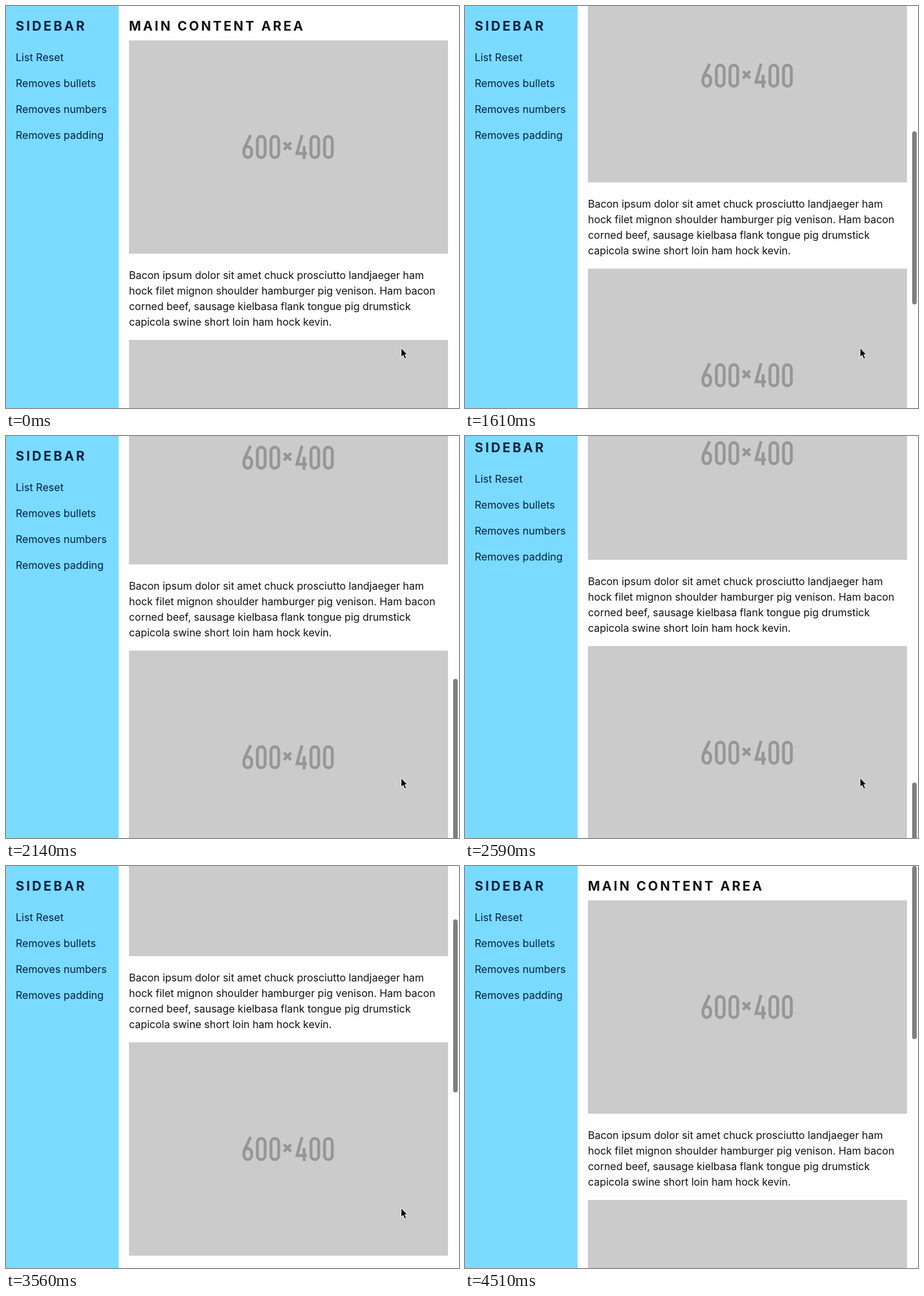
These frames come from a looping animation (700 px wide and 620 px high, 4810 ms). An HTML page:

```html
<!DOCTYPE html>
<html lang="en">
<head>
<meta charset="utf-8">
<title>Fixed sidebar scroll</title>
<style>
  html, body { margin: 0; width: 100%; height: 100%; overflow: hidden; background: #fff; }
  #stage { position: relative; width: 700px; height: 620px; overflow: hidden; background: #fefefe;
    font: 16px/24px Inter, sans-serif; color: #111; white-space: pre; }
  #stage > *, section, h2, p { position: absolute; margin: 0; }
  h2 { top: 19px; font: 700 20px/24px Inter, sans-serif; letter-spacing: 3.15px; }
  #side { left: 0; top: -2px; width: 174px; height: 720px; background: #7adaff; color: #001f3f; }
  #side h2 { left: 15px; top: 21px; letter-spacing: 3.3px; }
  #side p { left: 15px; top: 61px; line-height: 40px; letter-spacing: .04px; }
  #main { left: 190px; top: 0; }
  section svg { display: block; }
  section p { top: 350px; letter-spacing: -.025px; }
  #thumb { left: 690.5px; top: 0; width: 7px; border-radius: 3.5px; background: #7f7f7f; }
  #cursor { left: 0; top: 0; overflow: visible; }
</style>
</head>
<body>
<div id="stage">
  <div id="main"><h2>MAIN CONTENT AREA</h2></div>
  <div id="side"><h2>SIDEBAR</h2><p>List Reset
Removes bullets
Removes numbers
Removes padding</p></div>
  <div id="thumb"></div>
  <svg id="cursor" width="12" height="18">
    <path d="M.5 .5V14.5L3.7 11.6L6 17L8.6 15.9L6.3 10.7H10.3Z" fill="#000" stroke="#eee"/>
  </svg>
</div>
<svg width="0" height="0" style="position:absolute">
  <symbol id="card" viewBox="0 0 493 329">
    <path fill="#cbcbcb" d="M0 0H493V329H0Z"/>
    <g fill="none" stroke="#969696" stroke-width="4.5">
      <path d="M188 146L179.2 164.5Q177.6 168 177.6 171.5V174A6 6.8 0 0 0 189.6 174V170.5A6 6.6 0 0 0 178.2 167.5"/>
      <path d="M239.5 157.5L250.5 168.5M250.5 157.5L239.5 168.5"/>
      <path d="M267.5 146L259.6 174.4H275M270.6 163V183"/>
      <g id="zeros"></g>
    </g>
  </symbol>
</svg>
<script>
const $ = id => document.getElementById(id);
const LOOP = 4810, MAX = 1564, SECTIONS = 5;
const text = `Bacon ipsum dolor sit amet chuck prosciutto landjaeger ham
hock filet mignon shoulder hamburger pig venison. Ham bacon
corned beef, sausage kielbasa flank tongue pig drumstick
capicola swine short loin ham hock kevin.`;

$('zeros').innerHTML = [198.4, 219.4, 281.2, 302.2]
  .map(x => `<rect x="${x}" y="148.3" width="12" height="32.4" rx="6"/>`).join('');
for (let i = 0; i < SECTIONS; i++) {
  $('main').insertAdjacentHTML('beforeend',
    `<section style="top:${53 + 462 * i}px"><svg width="493" height="329"><use href="#card"/></svg><p>${text}</p></section>`);
}

const ticks = [0, 1250, 1340, 1430, 1520, 1610, 1700, 1790, 1880, 1970, 2060, 2140, 2230, 2320,
  2410, 2500, 2590, 2670, 2760, 2850, 2940, 3210, 3300, 3390, 3480, 3560, 3650, 3730, 3820,
  3910, 4000, 4080, 4170, 4260, 4340, 4400, 4450, 4510];

// Swipes as [time, scroll, velocity] knots
const down = [[1190, 0, 0], [1610, 572, 1.7], [2140, 1108, 1.2], [2510, MAX, 1.43]];
const up = [[3170, MAX, 0], [3300, 1537, -0.5], [3620, 0, -2.67]];

function hermite(knots, t) {
  const i = knots.findIndex(k => k[0] >= t);
  const [t0, a, v0] = knots[i - 1], [t1, b, v1] = knots[i];
  const d = t1 - t0, u = (t - t0) / d, w = 1 - u;
  return a * w * w * (1 + 2 * u) + b * u * u * (3 - 2 * u) + d * u * w * (v0 * w - v1 * u);
}

// Rubber band past the end of the page
const bounce = (ms, v) => 0.31 * v * ms * Math.exp(-0.0125 * ms);

function scrollAt(t) {
  if (t <= 1190) return 0;
  if (t <= 2510) return hermite(down, t);
  if (t <= 3170) return MAX + bounce(t - 2510, 1.43);
  if (t <= 3620) return hermite(up, t);
  return -bounce(t - 3620, 2.67);
}

function cursorAt(t) {
  if (t >= 4510) return [671, 640];
  const u = Math.min(1, Math.max(0, (t - 3780) / 560)), e = u * u * (3 - 2 * u);
  return [610 + 60 * e, 527 + 84 * e + Math.max(0, t - 4340) * 0.05];
}

function draw(now) {
  const t = ticks.findLast(k => k <= now % LOOP);
  const y = Math.round(scrollAt(t));
  const page = Math.min(MAX, Math.max(0, y)), over = y - page;
  const [cx, cy] = cursorAt(t);
  $('main').style.transform = `translateY(${-y}px)`;
  $('side').style.transform = `translateY(${-over}px)`;
  $('thumb').style.visibility = t ? 'visible' : 'hidden';
  $('thumb').style.height = 267 - 0.3 * Math.abs(over) + 'px';
  $('thumb').style.transform = `translateY(${page * 0.338 + Math.max(0, over) * 0.45}px)`;
  $('cursor').style.transform = `translate(${Math.round(cx)}px, ${Math.round(cy)}px)`;
}

const start = performance.now();
(function frame() {
  draw(performance.now() - start);
  requestAnimationFrame(frame);
})();
</script>
</body>
</html>
```
